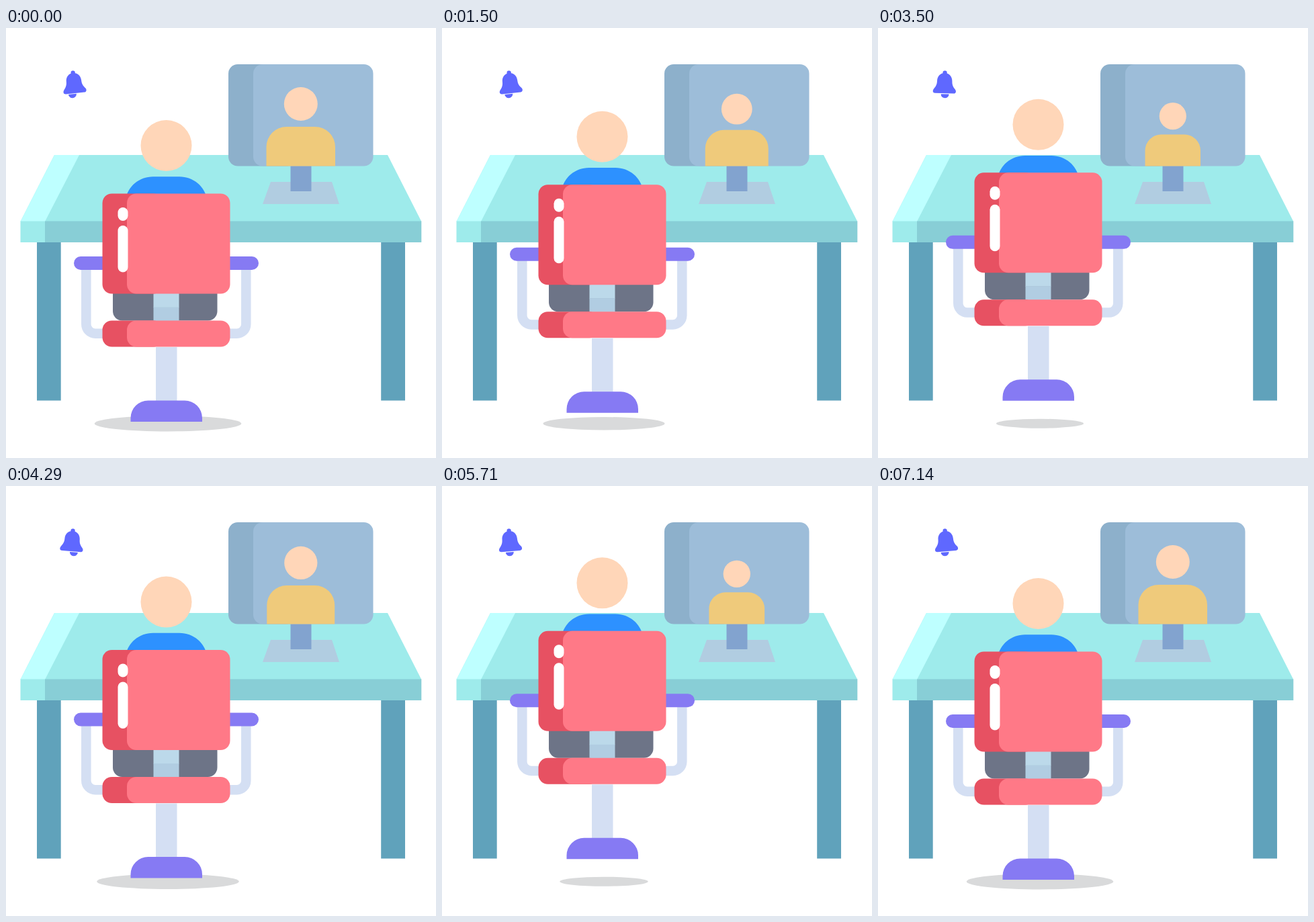
Animation, 640 px wide and 640 px high, one loop 7210 ms. Source, as an HTML page:

```html
<!DOCTYPE html>
<html lang="en">
<head>
<meta charset="utf-8">
<title>Video call at a desk</title>
<style>
  html, body { margin: 0; width: 100%; height: 100%; overflow: hidden; background: #fff; }
  svg { display: block; width: 100vw; height: 100vh; }
</style>
</head>
<body>
<svg viewBox="0 0 640 640">
  <g id="desk">
    <path fill="#60a2bb" d="M46 318H81.7V554.5H46ZM558.2 318H594V554.5H558.2Z"/>
    <path fill="#9eebeb" d="M72 189H568L618.3 288H21.5Z"/>
    <path fill="#beffff" d="M72 189H109L58 288H21.5Z"/>
    <path fill="#88ced6" d="M58 287.5H618.3V319H58Z"/>
    <path fill="#9eebeb" d="M21.5 287.5H58V319H21.5Z"/>
  </g>

  <g id="monitor">
    <path fill="#b1cde1" d="M394 229H485L496 262H382Z"/>
    <path fill="#82a3cf" d="M423.5 205H454.5V243H423.5Z"/>
    <rect x="331" y="54" width="100" height="151.5" rx="14" fill="#8db0cb"/>
    <rect x="368" y="54" width="178.5" height="151.5" rx="14" fill="#9dbdd9"/>
    <g id="caller">
      <circle cx="438.8" cy="113" r="25" fill="#ffd6b8"/>
      <path fill="#efca7b" d="M387.5 205.5V177A30 30 0 0 1 417.5 147H460A30 30 0 0 1 490 177V205.5Z"/>
    </g>
  </g>

  <ellipse id="shadow" cx="241" cy="588.7" rx="109.3" ry="11.7" fill="#d9dadb"/>

  <g id="chair">
    <circle cx="238.5" cy="175" r="38" fill="#ffd6b8"/>
    <path fill="#2d91ff" d="M178 255C181 236 198 221.3 219 221.3H258C279 221.3 296 236 299 255Z"/>
    <path fill="none" stroke="#d4dff3" stroke-width="14.5"
      d="M119.3 355V441A13.7 13.7 0 0 0 133 454.7H150M357.3 355V441A13.7 13.7 0 0 1 343.6 454.7H327"/>
    <rect x="101" y="340" width="275" height="20" rx="10" fill="#867af3"/>
    <path fill="#6d7487" d="M159 390H314.5V421.5A14 14 0 0 1 300.5 435.5H173A14 14 0 0 1 159 421.5Z"/>
    <path fill="#bcd9ea" d="M219.5 390H257.5V416H219.5Z"/>
    <path fill="#b1cde2" d="M219.5 415.5H257.5V436H219.5Z"/>
    <rect x="143.5" y="246.5" width="90" height="149" rx="14" fill="#e75162"/>
    <rect x="180" y="246.5" width="153.5" height="149" rx="14" fill="#ff7987"/>
    <rect x="166.5" y="267" width="15" height="20" rx="7.5" fill="#fff"/>
    <rect x="166.5" y="294" width="15" height="69.5" rx="7.5" fill="#fff"/>
    <rect x="143.5" y="435.5" width="90" height="39" rx="14" fill="#e75162"/>
    <rect x="180" y="435.5" width="153.5" height="39" rx="14" fill="#ff7987"/>
    <path fill="#d4dff3" d="M223 475H254.5V555H223Z"/>
    <path fill="#867af3" d="M185.5 586V580.5A26 26 0 0 1 211.5 554.5H266A26 26 0 0 1 292 580.5V586Z"/>
  </g>

  <g fill="#5f68ff">
    <g id="bell">
      <circle cx="99.6" cy="66.8" r="3.2"/>
      <path d="M99.6 67C106 67 110.8 72 110.8 79C110.8 85 113 88 115.6 91C118 94 116.5 97.2 113.5 97.2H86C82.5 97.2 81.5 94 83.7 91C86 88 88.4 85 88.4 79C88.4 72 93 67 99.6 67Z"/>
    </g>
    <path id="clapper" d="M-6 98.4H6A6 5.9 0 0 1 -6 98.4Z"/>
  </g>
</svg>
<script>
  const LOOP = 7210, HOP = LOOP / 3;
  const LIFT = 31.2, CALLER_SHRINK = 0.196, SHADOW_SHRINK = 0.405;

  const place = (id, transform) =>
    document.getElementById(id).setAttribute("transform", transform);
  const scaleAt = (x, y, s) => `translate(${x} ${y}) scale(${s}) translate(${-x} ${-y})`;
  const easeOut = x => 1 - (1 - x) ** 3;

  // Cosine with a whole number of cycles per loop, so it joins up at the ends.
  const swing = (t, cycles, degrees) =>
    Math.cos(2 * Math.PI * (cycles * t / LOOP + degrees / 360));

  // 0 on the floor, 1 at the top; each half of a hop starts fast and settles.
  function hopHeight(t) {
    const half = (t % HOP) / HOP * 2;
    return half < 1 ? easeOut(half) : 1 - easeOut(half - 1);
  }

  function draw(now) {
    const t = now % LOOP;
    const height = hopHeight(t);
    place("chair", `translate(0 ${-LIFT * height})`);
    place("shadow", scaleAt(241, 588.7, 1 - SHADOW_SHRINK * height));
    place("caller", scaleAt(438.8, 205.5, 1 - CALLER_SHRINK * height));

    const tilt = -6.5 * swing(t, 19, 25);
    const clapperX = 99.8 - 1.2 * swing(t, 11, -40);
    place("bell", `rotate(${tilt} 99.6 66)`);
    place("clapper", `translate(${clapperX} 0) rotate(${tilt} 0 98.4)`);
  }

  let start;
  function tick(now) {
    start ??= now;
    draw(now - start);
    requestAnimationFrame(tick);
  }
  draw(0);
  requestAnimationFrame(tick);
</script>
</body>
</html>
```
